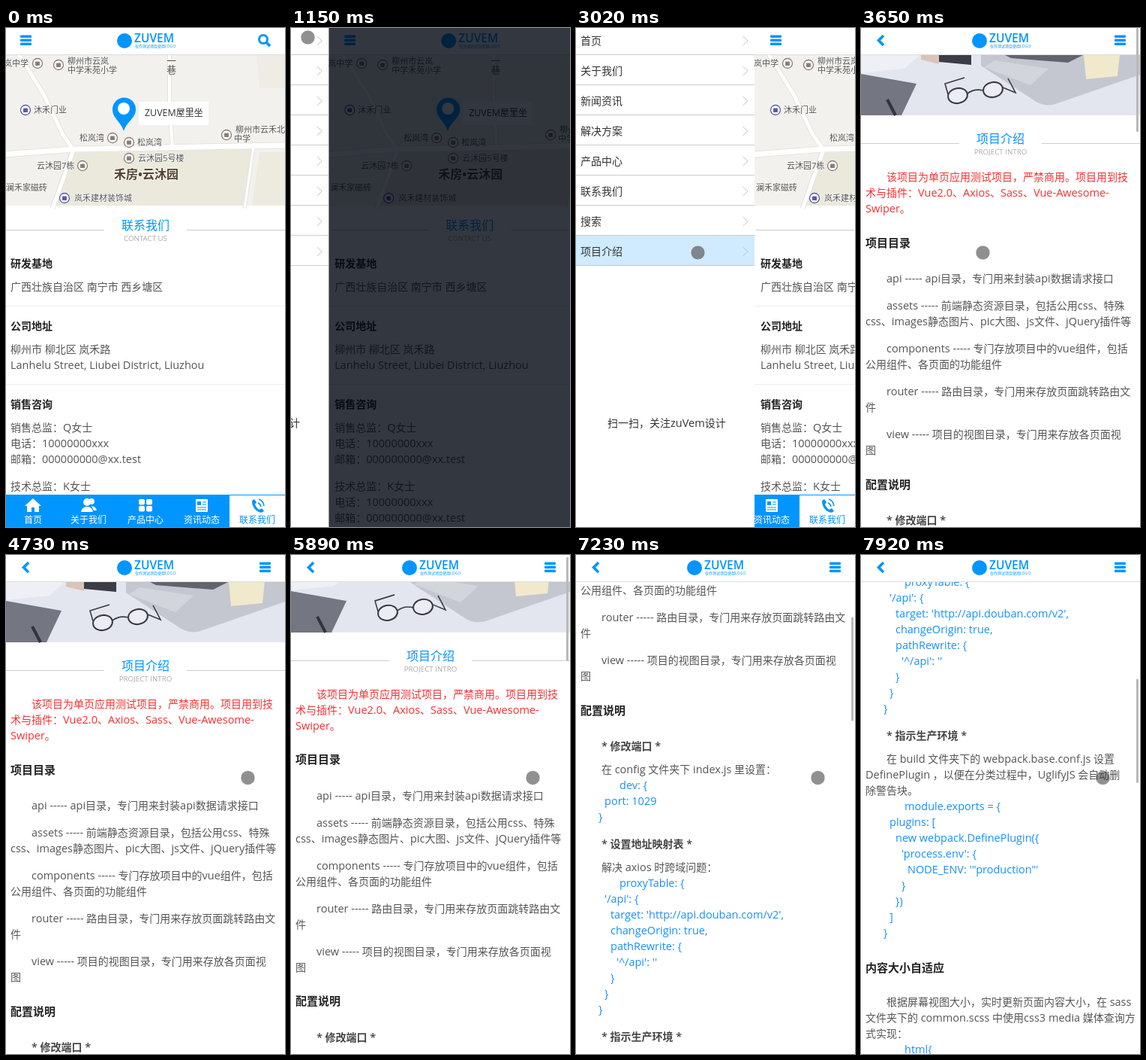
Recreate the animation shown at these times as an HTML page. Size 372 by 663 pixels, loop 8 s.

```html
<!DOCTYPE html>
<html lang="zh-CN">
<head>
<meta charset="utf-8">
<title>Mobile site</title>
<style>
html, body { margin: 0; width: 100%; height: 100%; overflow: hidden; background: #fff; }
svg { display: block; width: 372px; height: 663px; }
text { font-family: "Open Sans", "Noto Sans CJK SC", "Noto Sans CJK", sans-serif; white-space: pre; }
.halo text { paint-order: stroke; stroke: #f6f5f2; stroke-width: 2px; stroke-linejoin: round; }
</style>
</head>
<body>
<svg id="stage" viewBox="0 0 372 663"></svg>
<script>
const BLUE = '#0095ff';
const LOOP = 8000;

// Text is placed by its vertical centre; Latin runs are set slightly larger than the CJK glyphs.
function text(x, y, string, { size = 14, fill = '#555', weight = 400, anchor = 'start' } = {}) {
  const runs = string.replace(/[!-~]([ -~]*[!-~])?/g, run => `<tspan font-size="${size * 1.036}">${run}</tspan>`);
  return `<text x="${x}" y="${y + size * 0.37}" font-size="${size}" fill="${fill}" font-weight="${weight}" text-anchor="${anchor}">${runs}</text>`;
}
const rect = (x, y, w, h, fill, r = 0) => `<rect x="${x}" y="${y}" width="${w}" height="${h}" fill="${fill}" rx="${r}"/>`;
const circle = (x, y, r, fill, extra = '') => `<circle cx="${x}" cy="${y}" r="${r}" fill="${fill}" ${extra}/>`;
const shape = (d, fill) => `<path d="${d}" fill="${fill}"/>`;
const stroke = (d, color, width = 1) => `<path d="${d}" fill="none" stroke="${color}" stroke-width="${width}"/>`;
const group = (id, content) => `<g id="${id}">${content}</g>`;
const bars = x => [9.5, 14.5, 19.5].map(y => rect(x, y, 15, 3.6, BLUE, 1)).join('');

const header = icons => rect(-2, 0, 376, 36, '#fff') + rect(-2, 35, 376, 1, '#ddd') +
  circle(158, 17, 10, BLUE) +
  text(171, 13.5, 'ZUVEM', { size: 15, fill: BLUE, weight: 600 }) +
  text(172, 24, '仅作测试项目使用LOGO', { size: 5, fill: BLUE }) + icons;

const heading = (y, title, subtitle) =>
  rect(0, y + 6, 131, 1, '#ccc') + rect(241, y + 6, 131, 1, '#ccc') +
  text(186, y, title, { size: 16, fill: BLUE, anchor: 'middle' }) +
  text(186, y + 18, subtitle, { size: 9.4, fill: '#aaa', anchor: 'middle' });

function map() {
  const label = (x, y, s) => text(x, y, s, { size: 11 });
  const badge = (x, y, color = '#8a7d78') =>
    circle(x, y, 6.5, '#fff', `stroke="${color}" stroke-width="1.3"`) + rect(x - 3, y - 2.5, 6, 5.5, color, 1);
  const roads = ['M14 30L50 88L76 142L90 162L62 240', 'M-2 168L90 161L372 156', 'M218 36V100L222 160', 'M330 158L318 240'];
  const places = [[42, 47], [70, 49], [142, 146], [164, 152], [102, 183], [164, 173], [294, 142]];
  return rect(-2, 36, 376, 200, '#f3f1ee') +
    shape('M84 166L330 161L316 236H60Z', '#ebe9db') + shape('M338 165H372V236H328Z', '#edebdf') +
    shape('M334 36H372V80H338Z', '#efece6') +
    roads.map((d, i) => stroke(d, '#e6e3de', [7, 9, 6, 5][i])).join('') +
    roads.map((d, i) => stroke(d, '#fff', [5, 7, 4, 3][i])).join('') +
    places.map(([x, y]) => badge(x, y)).join('') + badge(26, 109, '#5a5aa8') + badge(78, 226, '#5a5aa8') +
    '<g class="halo">' +
    label(-3, 47, '岚中学') + label(82, 44, '柳州市云岚') + label(82, 56, '中学禾苑小学') +
    label(37, 109, '沐禾门业') + label(98, 146, '松岚湾') + label(175, 152, '松岚湾') +
    label(41, 183, '云沐园7栋') + label(176, 173, '云沐园5号楼') + label(0, 212, '澜禾家磁砖') +
    label(91, 226, '岚禾建材装饰城') + label(306, 135, '柳州市云禾北') + label(304, 147, '中学') +
    text(214, 43, '一', { size: 13 }) + text(214, 55, '巷', { size: 13 }) +
    text(144, 194, '禾房•云沐园', { size: 16, fill: '#544332', weight: 700 }) + '</g>' +
    shape('M157 137C153 124 142 120 142 108A15.500 15.500 0 0 1 173 108C173 120 161 124 157 137Z', BLUE) +
    circle(157, 107, 8, '#fff') + rect(177, 98, 93, 31, '#fff') +
    text(185, 113, 'ZUVEM屋里坐', { size: 12, fill: '#333' });
}

function contactPage() {
  const title = (y, s) => text(6, y, s, { fill: '#222', weight: 700 });
  const person = (y, role) => text(6, y, role) + text(6, y + 21, '电话：10000000xxx') + text(6, y + 42, '邮箱：000000000@xx.test');
  const search = circle(343, 15, 5.5, 'none', `stroke="${BLUE}" stroke-width="3"`) + stroke('M347 19L352 24', BLUE, 3.5);
  return rect(-2, 0, 376, 663, '#fff') + map() + header(bars(19) + search) +
    heading(262, '联系我们', 'CONTACT US') +
    title(313, '研发基地') + text(6, 344, '广西壮族自治区 南宁市 西乡塘区') + rect(-2, 369, 376, 1, '#eee') +
    title(396, '公司地址') + text(6, 427, '柳州市 柳北区 岚禾路') +
    text(6, 448, 'Lanhelu Street, Liubei District, Liuzhou') + rect(-2, 473, 376, 1, '#eee') +
    title(500, '销售咨询') + person(531, '销售总监：Q女士') + person(609, '技术总监：K女士') +
    group('shade', rect(-2, 0, 376, 663, 'rgba(0,6,16,.8)'));
}

function footer() {
  const tabs = [[36, '首页'], [110, '关于我们'], [186, '产品中心'], [261, '资讯动态'], [335, '联系我们']];
  const grid = [[177, 626], [187, 626], [177, 635], [187, 635]].map(([x, y]) => rect(x, y, 8, 7.5, '#fff', 2)).join('');
  return rect(0, 620, 372, 43, BLUE) + rect(298, 621, 74, 42, '#fff') +
    shape('M25 635L36 625L47 635H44V643H38V637H34V643H28V635Z', '#fff') +
    circle(114, 629, 4, '#fff') + circle(108, 630, 5, '#fff') +
    shape('M100 643Q101 636 108 636Q115 636 116 643ZM114 635Q120 636 121 641H117Z', '#fff') + grid +
    rect(253, 626, 16, 17, '#fff', 1) + rect(255, 629, 5, 5, BLUE) +
    stroke('M262 630H267M262 633H267M255 637H267M255 640H267', BLUE) +
    shape('M331 626L334 630L332 633Q334 638 338 640L341 638L344 642Q341 645 337 643Q329 639 328 630Q328 627 331 626Z', BLUE) +
    stroke('M336 631Q339 632 340 636M337 626Q343 628 344 635', BLUE, 1.6) +
    tabs.map(([x, s], i) => text(x, 654, s, { size: 12, fill: i === 4 ? BLUE : '#fff', anchor: 'middle' })).join('');
}

function drawer() {
  const items = ['首页', '关于我们', '新闻资讯', '解决方案', '产品中心', '联系我们', '搜索', '项目介绍'];
  return rect(0, 0, 238, 663, '#fff') + group('tapped', rect(0, 276, 238, 40, '#d0eaff')) +
    items.map((s, i) => {
      const y = 17 + i * 40;
      return text(6, y, s, { fill: '#333' }) + stroke(`M222.500 ${y - 6}L229 ${y}L222.500 ${y + 6}`, '#c4c4c4') +
        rect(0, y + 18, 238, 1, '#ccc');
    }).join('') +
    text(42, 525, '扫一扫，关注zuVem设计', { fill: '#333' });
}

function desk() {
  const lens = (x, y) => `<ellipse cx="${x}" cy="${y}" rx="13" ry="10" fill="rgba(255,255,255,.3)" stroke="#3a3a44" stroke-width="2" transform="rotate(-10 ${x} ${y})"/>`;
  return rect(0, 36, 372, 80, '#e4e6ef') +
    shape('M0 36H78L58 54L0 60Z', '#eef0f6') +
    shape('M160 36H372V62L262 100Q246 106 232 97L160 50Z', '#c4c6d0') +
    shape('M178 43L250 54L226 76L164 52Z', '#d3d5dd') +
    shape('M192 36H296L276 46L200 40Z', '#62636d') +
    shape('M80 36H104V48L80 42Z', '#d9c4b8') + shape('M104 36H147V49L104 45Z', '#3c3c47') +
    shape('M297 36H345L342 64L300 68Z', '#f1e9cc') +
    shape('M0 61L74 74L54 116H0Z', '#747682') + stroke('M35 95L46 116', '#33333c', 4) +
    lens(129, 90) + lens(176, 82) +
    stroke('M142 87Q151 80 163 83M116 88L112 74L138 66M189 79L206 86L196 67', '#3a3a44', 1.6);
}

function projectPage() {
  const lines = (y, rows, style) => rows.map(([x, s], i) => text(x, y + i * 21, s, style)).join('');
  const title = (y, s) => text(6, y, s, { size: 15, fill: '#222', weight: 700 });
  const note = (y, s) => text(34, y, s, { fill: '#444', weight: 600 });
  const prose = (y, ...rows) => lines(y, rows.map((s, i) => [i ? 6 : 34, s]));
  const code = (y, ...rows) => lines(y, rows, { fill: '#1590ff' });
  const content = desk() + heading(147, '项目介绍', 'PROJECT INTRO') +
    lines(198, [[34, '该项目为单页应用测试项目，严禁商用。项目用到技'],
      [6, '术与插件：Vue2.0、Axios、Sass、Vue-Awesome-'], [6, 'Swiper。']], { fill: '#f92f2f' }) +
    title(285, '项目目录') +
    prose(333, 'api ----- api目录，专门用来封装api数据请求接口') +
    prose(369, 'assets ----- 前端静态资源目录，包括公用css、特殊', 'css、images静态图片、pic大图、js文件、jQuery插件等') +
    prose(426, 'components ----- 专门存放项目中的vue组件，包括', '公用组件、各页面的功能组件') +
    prose(483, 'router ----- 路由目录，专门用来存放页面跳转路由文', '件') +
    prose(540, 'view ----- 项目的视图目录，专门用来存放各页面视', '图') +
    title(606, '配置说明') + note(654, '* 修改端口 *') +
    prose(685, '在 config 文件夹下 index.js 里设置：') +
    code(706, [58, 'dev: {'], [38, 'port: 1029'], [30, '}']) +
    note(784, '* 设置地址映射表 *') + prose(815, '解决 axios 时跨域问题：') +
    code(836, [58, 'proxyTable: {'], [38, `'/api': {`], [46, `target: 'http://api.douban.com/v2',`],
      [46, 'changeOrigin: true,'], [46, 'pathRewrite: {'], [54, `'^/api': ''`], [46, '}'], [38, '}'], [30, '}']) +
    note(1040, '* 指示生产环境 *') +
    prose(1071, '在 build 文件夹下的 webpack.base.conf.js 设置',
      'DefinePlugin ，以便在分类过程中，UglifyJS 会自动删', '除警告块。') +
    code(1134, [58, 'module.exports = {'], [38, 'plugins: ['], [46, 'new webpack.DefinePlugin({'],
      [54, `'process.env': {`], [62, `NODE_ENV: '"production"'`], [54, '}'], [46, '})'], [38, ']'], [30, '}']) +
    title(1348, '内容大小自适应') +
    prose(1394, '根据屏幕视图大小，实时更新页面内容大小，在 sass',
      '文件夹下的 common.scss 中使用css3 media 媒体查询方', '式实现：') +
    code(1457, [58, 'html{']);
  return rect(-2, 0, 376, 663, '#fff') + group('content', content) +
    header(stroke('M30 10L23.500 16.500L30 23', BLUE, 3.6) + bars(338));
}

document.getElementById('stage').innerHTML =
  group('project', projectPage()) + group('contact', contactPage()) + group('footer', footer()) +
  group('drawer', drawer()) + group('scrollbar', rect(367, 0, 3, 138, '#b9b9b9', 1)) +
  group('cursor', circle(0.5, 0.5, 9.5, 'rgba(60,60,60,.57)', 'stroke="rgba(255,255,255,.6)"'));

const part = id => document.getElementById(id);
const move = (id, x, y) => part(id).setAttribute('transform', `translate(${x} ${y})`);
const fade = (id, opacity) => part(id).setAttribute('opacity', opacity);
const show = (id, visible) => part(id).setAttribute('display', visible ? 'inline' : 'none');

// Progress from 0 to 1 in discrete steps; the first step lands at start, the last at end.
function ramp(t, start, end, steps, power = 1) {
  if (t < start) return 0;
  const p = Math.min(steps, Math.floor((t - start) / (end - start) * (steps - 1) + 1e-6) + 1) / steps;
  return p < 0.5 ? (2 * p) ** power / 2 : 1 - (2 - 2 * p) ** power / 2;
}

function render(t) {
  const closing = ramp(t, 3098, 3410, 5);
  const offset = 240 * (ramp(t, 1150, 1400, 4, 1.2) - closing);
  const scroll = 100 * ramp(t, 5890, 6060, 3, 3.3) + 200 * ramp(t, 6360, 6680, 5, 4) +
    200 * ramp(t, 7080, 7310, 4, 3.3) + 300 * ramp(t, 7620, 7920, 5, 3.3);
  const enter = ramp(t, 150, 600, 7);
  const toItem = ramp(t, 1710, 2020, 5, 1.3);
  const toText = ramp(t, 4180, 4430, 4, 1.3);

  move('contact', offset, 0);
  move('project', offset, 0);
  move('drawer', offset - 240, 0);
  move('content', 0, -scroll);
  move('scrollbar', 0, scroll * 0.206);
  move('cursor', 337 - 315 * enter + 140 * toItem + 160 * toText, 760 - 748 * enter + 286 * toItem - 2.5 * toText);
  fade('contact', 1 - closing);
  fade('footer', 1 - closing);
  fade('content', ramp(t, 3580, 3650, 2));
  const menuOpen = t >= 1150 && t < 3020;
  show('shade', menuOpen);
  show('footer', !menuOpen);
  show('tapped', t >= 3020);
  show('scrollbar', (t >= 3580 && t < 4350) || t >= 5890);
}

const began = performance.now();
function tick() {
  render((performance.now() - began) % LOOP);
  requestAnimationFrame(tick);
}
tick();
</script>
</body>
</html>
```
